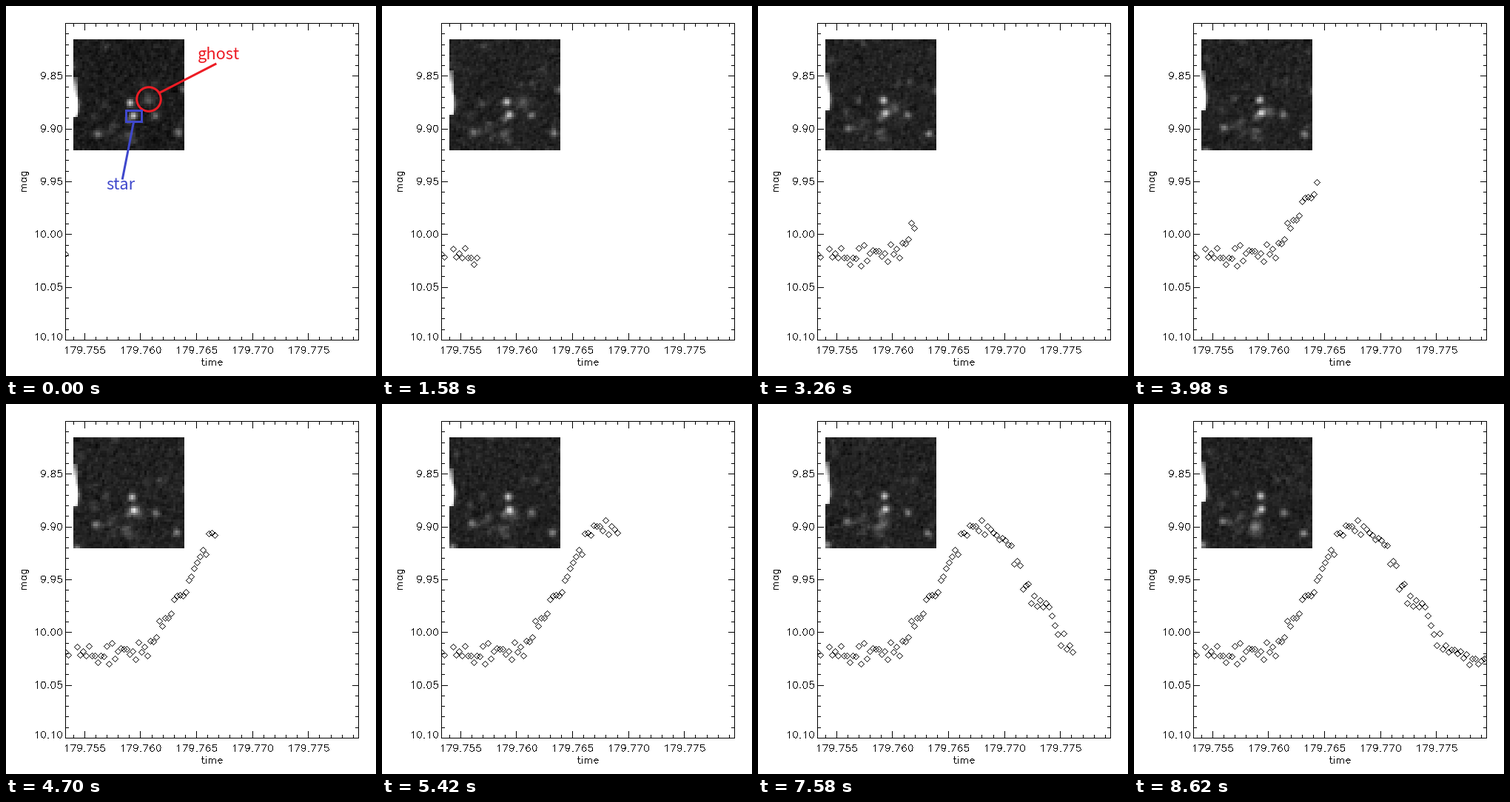
A matplotlib script for the animation above (8700 ms loop, 500x500 px).

```python
import numpy as np
import matplotlib.pyplot as plt
from matplotlib.animation import FuncAnimation
from matplotlib.patches import Circle, Rectangle

SIZE, DPI = 500, 100
PX = 72 / DPI  # points per pixel
LEFT, RIGHT, TOP, BOTTOM = 80, 476, 23, 451
HOLD, STEP, LOOP, INTERVAL = 700, 80, 8700, 20
SAMPLES = 101
RED, BLUE = "#ed1c24", "#3f48cc"
GLYPH_SCALE = 0.44


def arc(cx, cy, rx, ry, start=0, stop=360, n=15):
    a = np.radians(np.linspace(start, stop, n))
    return list(zip(cx + rx * np.cos(a), cy + ry * np.sin(a)))


# Stroke font: advance width and polylines, y up from the baseline
SIX = [arc(10.5, 6.5, 6.5, 6.5), arc(11, 8, 7, 13, 180, 45, 8)]
BOWL = arc(9, 7, 6, 7, 35, 325, 12)
GLYPHS = {
    "0": (20, [arc(10, 10.5, 7, 10.5)]),
    "1": (20, [[(6, 17), (11, 21), (11, 0)]]),
    "5": (20, [[(15, 21), (5, 21), (4, 12)] + arc(10, 7, 7, 7, 140, -155, 13)]),
    "6": (20, SIX),
    "7": (20, [[(3, 21), (17, 21), (7, 0)]]),
    "8": (20, [arc(10, 16.5, 6, 4.5), arc(10, 6, 7, 6)]),
    "9": (20, [[(20 - x, 21 - y) for x, y in s] for s in SIX]),
    ".": (10, [[(4, 1), (6, 1)]]),
    "t": (12, [[(5, 21)] + arc(8.5, 4, 3.5, 4, 180, 300, 5), [(2, 14), (9, 14)]]),
    "i": (8, [[(4, 14), (4, 0)], [(4, 20), (4, 21)]]),
    "m": (30, [[(4, 14), (4, 0)]] + [
        arc(x, 9, 5.5, 5, 180, 0, 7) + [(x + 5.5, 0)] for x in (9.5, 20.5)]),
    "e": (18, [[(3, 8), (15, 8)] + arc(9, 7, 6, 7, 8, 325, 12)]),
    "a": (19, [[(15, 14), (15, 0)], BOWL]),
    "g": (19, [[(15, 14)] + arc(9.5, -1.5, 5.5, 5.5, 0, -140, 7), BOWL]),
}


def draw(canvas, points, xmin=0, xmax=SIZE - 1):
    """Draw a crisp one-pixel polyline in black."""
    points = np.rint(points)
    for a, b in zip(points, points[1:]):
        n = int(abs(b - a).max()) + 1
        x, y = np.rint(np.linspace(a, b, n)).astype(int).T
        inside = (x >= xmin) & (x <= xmax)
        canvas[y[inside], x[inside]] = 0


def write(canvas, text, x, y, align=0.5, vertical=False):
    """Write stroke text; align is the anchored share of its width."""
    pen = -align * sum(GLYPHS[c][0] for c in text)
    for c in text:
        width, lines = GLYPHS[c]
        for line in lines:
            u, v = (np.array(line) + (pen, 0)).T * GLYPH_SCALE
            draw(canvas, np.column_stack((x - v, y - u) if vertical else (x + u, y - v)))
        pen += width


def blank_plot():
    canvas = np.full((SIZE, SIZE), 255.0)
    draw(canvas, [(LEFT, TOP), (RIGHT, TOP), (RIGHT, BOTTOM), (LEFT, BOTTOM), (LEFT, TOP)])
    for i in range(-1, 25):
        x = 105.85 + 15.125 * i
        size = 4 if i % 5 else 9
        draw(canvas, [(x, BOTTOM), (x, BOTTOM - size)])
        draw(canvas, [(x, TOP), (x, TOP + size)])
        if i % 5 == 0:
            write(canvas, f"{179.755 + i / 1000:.3f}", x, 469)
    for i in range(1, 31):
        y = TOP + 14.265 * i
        size = 4 if i % 5 else 8
        draw(canvas, [(LEFT, y), (LEFT + size, y)])
        draw(canvas, [(RIGHT, y), (RIGHT - size, y)])
        if i % 5 == 0:
            write(canvas, f"{9.8 + i / 100:.2f}", 76.6, min(y + 4, BOTTOM), align=1)
    write(canvas, "time", 278, 485)
    write(canvas, "mag", 27, 237, vertical=True)
    return canvas


# Light curve: flat, a steep climb, a rounded top and a fall, with scatter
rng = np.random.default_rng(4)
STEPS = np.arange(SAMPLES)
CURVE = np.interp(STEPS, [0, 29, 33, 43, 49, 54, 60, 65, 71, 78, 88, 100],
                  [340, 334, 293, 237, 179, 165, 168, 188, 246, 281, 342, 344])
CURVE += np.clip(rng.normal(0, 7, SAMPLES), -14, 14)
LOST = (2, 3)  # steps without a measurement


def add_sample(canvas, k):
    x, y = np.rint((LEFT + 3.965 * k, CURVE[k]))
    draw(canvas, [(x - 4, y), (x, y - 4), (x + 4, y), (x, y + 4), (x - 4, y)], LEFT, RIGHT)


# Star field: a few bright stars (x, y, brightness) among random faint ones
BRIGHT = [(168, 131, 165), (172, 148, 175), (166, 155, 60), (202, 148, 90),
          (233, 171, 105), (124, 173, 90), (239, 112, 80), (103, 208, 110)]
FAINT = zip(rng.uniform(91, 241, 26), rng.uniform(45, 210, 26), rng.uniform(8, 38, 26))
FIELD = BRIGHT + list(FAINT)
GX, GY = np.meshgrid(91 + 3 * (np.arange(50) + 0.5), 45 + 3 * (np.arange(50) + 0.5))


def blob(x, y, level, rx, ry=None):
    return level * np.exp(-((GX - x) / rx) ** 2 / 2 - ((GY - y) / (ry or rx)) ** 2 / 2)


def sky(k):
    noise_rng = np.random.default_rng(100 + k)
    noise = noise_rng.normal(0, 8, (50, 50))
    noise = 0.75 * noise + 0.3 * (np.roll(noise, 1, 0) + np.roll(noise, 1, 1))
    image = (34 if k else 27) + noise
    # The field turns slowly about a point right of the centre
    turn = 0.165 * np.sin(np.pi / 2 * k / 100)
    for x, y, level in FIELD:
        image += blob(x - turn * (y - 150), y + turn * (x - 209), level, 3.5)
    image += blob(193 - 0.27 * k, 126 + 0.39 * k, 55, 5.8)
    # Overexposed star with its bleeding column
    cy = 135 - 100 * turn
    image += blob(91, cy, 300, 4.6, 7)
    top = cy - 39 - noise_rng.normal(0, 3)
    column = (GX < 96) & (GY > top) & (GY < cy + 15)
    image += column * np.clip(80 + 7 * (GY - top), 0, 220) * np.where(GX < 94, 1, 0.7)
    return np.clip(image, 0, 255)


PLOT = blank_plot()
fig = plt.figure(figsize=(SIZE / DPI, SIZE / DPI), dpi=DPI, facecolor="white")
ax = fig.add_axes([0, 0, 1, 1])
ax.axis("off")
stage = ax.imshow(PLOT, cmap="gray", vmin=0, vmax=255, interpolation="nearest",
                  extent=(0, SIZE, SIZE, 0), aspect="auto")
ax.set(xlim=(0, SIZE), ylim=(SIZE, 0))

label = dict(family="Noto Sans CJK JP", fontsize=21.8 * PX, va="baseline")
notes = [
    ax.add_patch(Circle((193, 126), 16.3, fill=False, ec=RED, lw=3 * PX)),
    *ax.plot([208, 283], [117, 78.5], color=RED, lw=3 * PX),
    ax.text(258.5, 72, "ghost", color=RED, **label),
    ax.add_patch(Rectangle((162, 141), 21, 15, fill=False, ec=BLUE, lw=3 * PX)),
    *ax.plot([172.5, 157.5], [157, 233], color=BLUE, lw=3 * PX),
    ax.text(135.5, 248, "star", color=BLUE, **label),
]


def update(frame):
    t = frame * INTERVAL
    k = 0 if t < HOLD else 1 + (t - HOLD) // STEP
    canvas = PLOT.copy()
    canvas[45:195, 91:241] = np.kron(sky(k), np.ones((3, 3)))
    for i in range(k + 1):
        if i not in LOST:
            add_sample(canvas, i)
    stage.set_data(canvas)
    for note in notes:
        note.set_visible(k == 0)
    return [stage, *notes]


anim = FuncAnimation(fig, update, frames=LOOP // INTERVAL, interval=INTERVAL,
                     repeat=True, repeat_delay=0)
plt.show()
```
